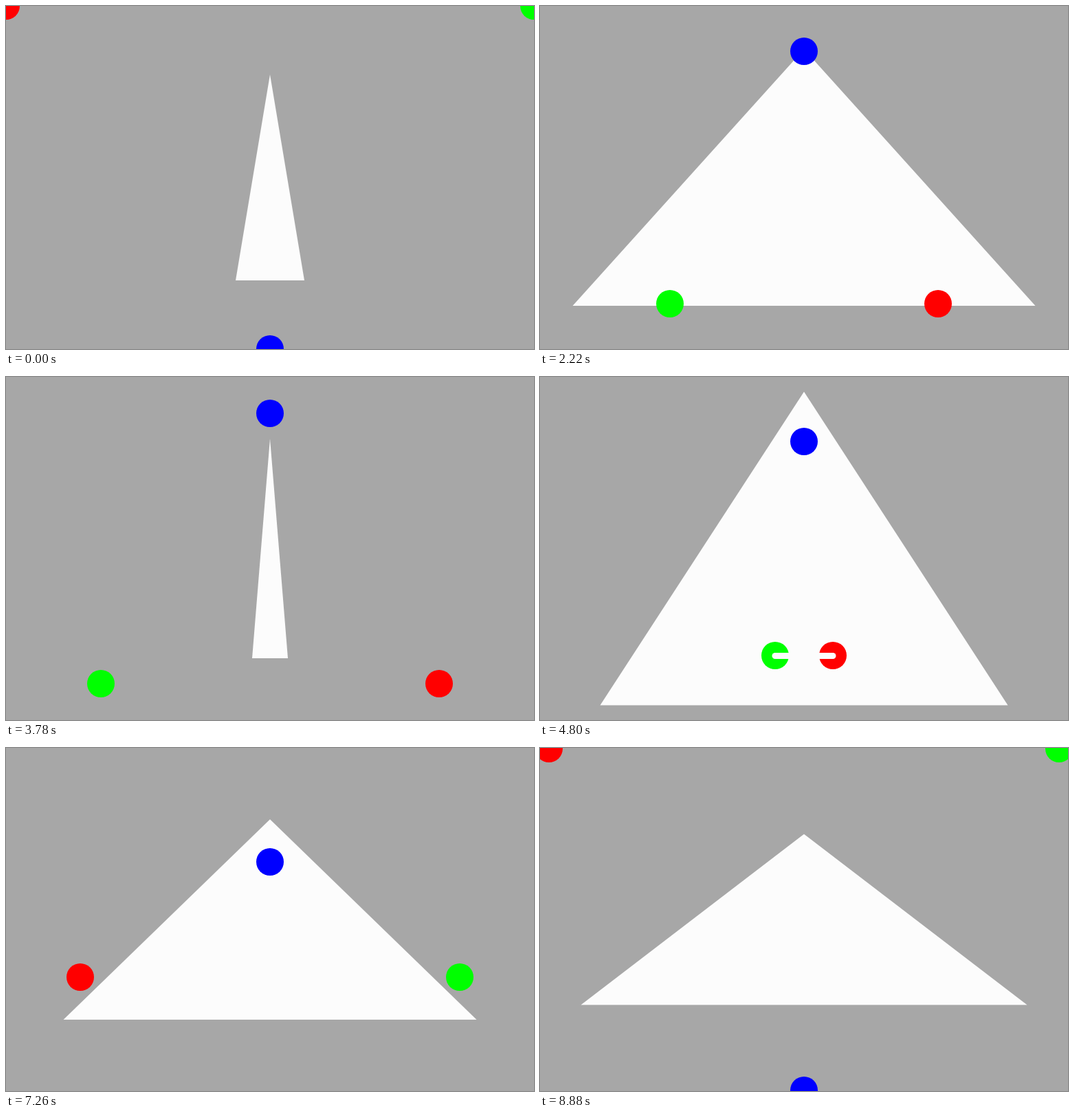
Animation of 768 by 500 pixels, one loop 9660 ms. Source, as an HTML page with a canvas:

```html
<!DOCTYPE html>
<html lang="en">
<head>
<meta charset="utf-8">
<title>Mirrored dots and a triangle</title>
<style>
  html, body { margin: 0; width: 100%; height: 100%; overflow: hidden; background: #a7a7a7; }
  canvas { display: block; }
</style>
</head>
<body>
<canvas id="stage" width="768" height="500"></canvas>
<script>
const ctx = document.getElementById('stage').getContext('2d');
const W = 768, H = 500, CX = W / 2, CY = H / 2;
const LOOP = 9660, STEP = 60, RADIUS = 20, LINK = 100;

// Turning points of the pointer, as offsets from the centre
const path = [
  { t: 0, x: -CX, y: -CY },
  { t: 720, x: -60, y: 20 },
  { t: 1500, x: 15, y: 130 },
  { t: 1860, x: 57, y: 177 },
  { t: 2220, x: 195, y: 184 },
  { t: 3300, x: 310, y: 235 },
  { t: 3780, x: 246, y: 197 },
  { t: 4800, x: 42, y: 156 },
  { t: 6000, x: 284, y: 224 },
  { t: 6420, x: 284, y: 224 },
  { t: 7260, x: -276, y: 84 },
  { t: 7860, x: -296, y: 134 },
  { t: 8880, x: -371, y: -249 }
];

// The triangle takes the next size at a steady beat
const BEAT = 1120;
const sizes = [
  [100, 300], [673, 374], [711, 473], [52, 320],
  [593, 457], [528, 5], [601, 292], [649, 249]
];

function slope(i, axis) {
  const a = path[i], b = path[i + 1];
  return a && b ? (b[axis] - a[axis]) / (b.t - a.t) : 0;
}

// Harmonic mean keeps the curve free of overshoot
function tangent(i, axis) {
  const a = slope(i - 1, axis), b = slope(i, axis);
  return a * b > 0 ? 2 * a * b / (a + b) : 0;
}

function pointer(t) {
  let i = 0;
  while (i < path.length - 2 && path[i + 1].t <= t) i++;
  const a = path[i], b = path[i + 1], d = b.t - a.t;
  const u = Math.min(1, (t - a.t) / d), v = 1 - u;
  return ['x', 'y'].map(k =>
    a[k] * (1 + 2 * u) * v * v + b[k] * u * u * (3 - 2 * u) +
    d * u * v * (tangent(i, k) * v - tangent(i + 1, k) * u));
}

function triangle(w, h) {
  ctx.fillStyle = '#fcfcfc';
  ctx.beginPath();
  ctx.moveTo(CX, CY - h / 2);
  ctx.lineTo(CX + w / 2, CY + h / 2);
  ctx.lineTo(CX - w / 2, CY + h / 2);
  ctx.fill();
}

function dot(x, y, color) {
  ctx.fillStyle = color;
  ctx.beginPath();
  ctx.arc(CX + x, CY + y, RADIUS, 0, Math.PI * 2);
  ctx.fill();
}

function link(x, y) {
  ctx.strokeStyle = '#fcfcfc';
  ctx.lineWidth = 9;
  ctx.lineCap = 'round';
  ctx.beginPath();
  ctx.moveTo(CX - x, CY + y + 0.5);
  ctx.lineTo(CX + x, CY + y + 0.5);
  ctx.stroke();
}

function draw(t) {
  const [x, y] = pointer(t);
  const beat = Math.min(Math.floor(t / BEAT), sizes.length - 1);
  ctx.fillStyle = '#a7a7a7';
  ctx.fillRect(0, 0, W, H);
  triangle(...sizes[beat]);
  dot(x, y, '#f00');
  dot(-x, y, '#0f0');
  dot(0, -y, '#00f');
  if (Math.abs(2 * x) < LINK) link(x, y);
}

const start = performance.now();
function frame() {
  const t = (performance.now() - start) % LOOP;
  draw(Math.floor(t / STEP) * STEP);
  requestAnimationFrame(frame);
}
frame();
</script>
</body>
</html>
```
